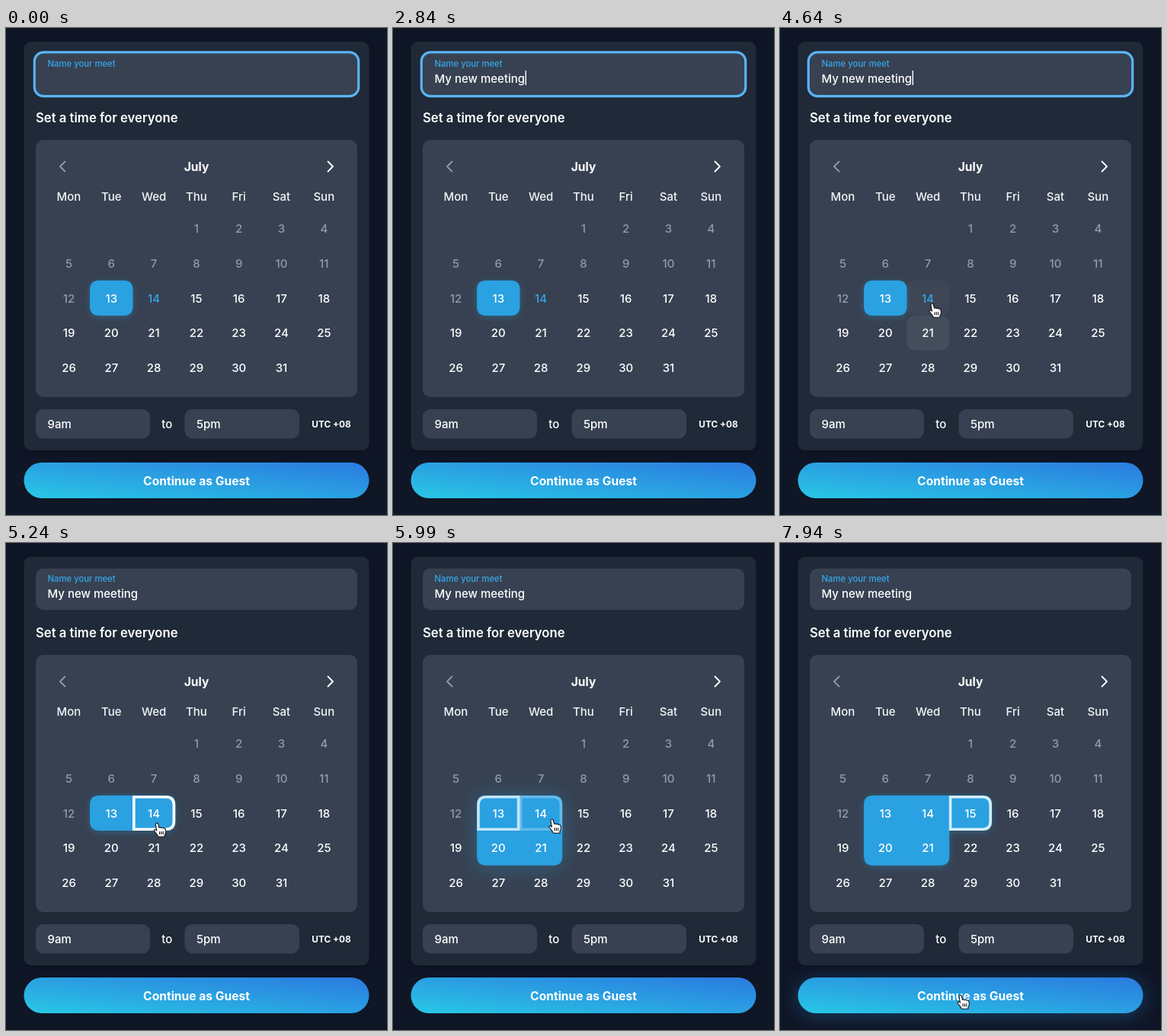
An HTML page for the animation above (7.99 s loop, 500 px wide and 640 px high).

```html
<!DOCTYPE html>
<html lang="en">
<head>
<meta charset="utf-8">
<title>Set a time</title>
<style>
html, body { margin: 0; width: 100%; height: 100%; overflow: hidden; background: #0f1626; }
svg { display: block; }
text { font: 500 15px Inter, Roboto, sans-serif; fill: #fff; white-space: pre; }
.mid { text-anchor: middle; }
.bold { font-weight: 700; font-size: 15.6px; }
.field { fill: #374151; }
#card { filter: drop-shadow(0 2px 6px #0a0f1c99); }
</style>
</head>
<body>
<svg width="500" height="640" viewBox="0 0 500 640">
  <defs>
    <linearGradient id="sky" x1="0" y1="1" x2="1" y2="0">
      <stop offset="0" stop-color="#28c8e5"/>
      <stop offset=".5" stop-color="#2aa0e2"/>
      <stop offset="1" stop-color="#2a7ae0"/>
    </linearGradient>
  </defs>
  <rect width="500" height="640" fill="#0f1626"/>
  <rect id="card" x="23.5" y="18" width="453" height="537" rx="9" fill="#1f2937"/>
  <rect class="field" x="39" y="33.5" width="422" height="54.5" rx="10"/>
  <rect id="ring" x="37.3" y="31.8" width="425.4" height="57.9" rx="12" fill="none" stroke="#5ab4f5" stroke-width="3.2"/>
  <text x="54.5" y="51" style="font-size:11.3px;fill:#36a7ea">Name your meet</text>
  <text id="typed" x="54.5" y="71.5"></text>
  <rect id="caret" y="56" width="1.4" height="19" fill="#fff"/>
  <text x="39" y="124" style="font-size:16.7px;font-weight:600">Set a time for everyone</text>

  <rect class="field" x="39" y="147" width="422" height="338" rx="10"/>
  <g fill="none" stroke-width="1.8" stroke-linecap="round" stroke-linejoin="round">
    <path d="M77.5 175.5L71 182l6.5 6.5" stroke="#9299a4"/>
    <path d="M422.5 175.5L429 182l-6.5 6.5" stroke="#fff"/>
  </g>
  <text class="mid bold" x="250" y="188">July</text>
  <g id="week"></g>
  <g id="hover" fill="#4b5361"></g>
  <g id="picked" fill="#2aa1e1"></g>
  <g id="focus" fill="none" stroke="#fff" stroke-width="3.6"></g>
  <g id="days"></g>

  <rect class="field" x="39" y="501" width="150" height="38.5" rx="10"/>
  <rect class="field" x="234.5" y="501" width="150.5" height="38.5" rx="10"/>
  <text x="54.5" y="526">9am</text>
  <text class="mid" x="211.3" y="526">to</text>
  <text x="250" y="526">5pm</text>
  <text class="mid bold" x="427" y="525" style="font-size:11.8px">UTC +08</text>

  <rect id="button" x="23.5" y="571" width="453" height="47" rx="23.5" fill="url(#sky)"/>
  <text class="mid bold" x="250" y="601">Continue as Guest</text>

  <g id="hand" stroke="#111" stroke-width="1.1" stroke-linejoin="round">
    <path fill="#fff" d="M-2 2Q-2 0-.5 0Q1 0 1.5 2L2.6 6.4Q4 5 5.4 6.6Q7 5.4 8.2 7.2Q10.6 6.4 11 9L11.4 12Q11.4 14 9.9 16V18.2H1.6L-.8 14.6L-3.6 11Q-4.6 9.2-2.8 8.8Q-1.6 8.8-.6 10.2Z"/>
    <path fill="none" d="M3.2 11.2v4M5.5 11.2v4M7.8 11.2v4"/>
  </g>
</svg>
<script>
const LOOP = 7990, W = 55.8, H = 45.7, LEFT = 54.6, TOP = 240.7, BLUR_AT = 4790;
const el = id => document.getElementById(id);
const days = Array.from({ length: 31 }, (_, i) => i + 1);

// Words of the title: text, start, time per letter
const words = [['My ', 310, 65], ['new ', 940, 75], ['meeting', 1390, 167]];

// Clicks: time, day (0 is the button)
const clicks = [[BLUR_AT, 14], [5390, 21], [5640, 20], [5790, 13], [5960, 14], [6290, 15], [7920, 0]];

// Pointer stops: time, x, y of the fingertip
const stops = [
  [3840, 300, 600], [4190, 300, 600], [4540, 196, 404], [4640, 200, 362], [5190, 200, 362],
  [5390, 190, 398], [5590, 142, 395], [5790, 148, 356], [5990, 209, 363], [6340, 247, 357],
  [7040, 247, 357], [7140, 229, 387], [7690, 237, 594], [LOOP, 237, 594]
];

// Share of the last few ms in which a test held: a linear fade
const soft = (test, t, ms = 150) => {
  let sum = 0;
  for (let i = 0; i < 15; i++) sum += test(t - i * ms / 15) ? 1 : 0;
  return sum / 15;
};

function pointer(t) {
  const i = stops.findIndex(s => s[0] > t);
  if (i < 1) return null;
  const [a, x, y] = stops[i - 1], [b, u, v] = stops[i];
  const k = (t - a) / (b - a), e = k * k * (3 - 2 * k);
  return [x + (u - x) * e, y + (v - y) * e];
}

const col = n => (n + 2) % 7, row = n => Math.floor((n + 2) / 7);

function hovers(n, t) {
  const p = pointer(t);
  return p && Math.floor((p[0] - LEFT) / W) === col(n) && Math.floor((p[1] - TOP) / H) === row(n);
}

function onButton(t) {
  const p = pointer(t);
  return p && p[1] > 571 && p[1] < 618;
}

const isPicked = (n, t) => n === 13 || clicks.some(c => c[1] === n && c[0] <= t);
const isFocused = (n, t) => clicks.filter(c => c[0] <= t).pop()?.[1] === n;

// Day outline; a corner is round unless a picked day touches one of its sides
function cell(n, t, inset, alpha) {
  const x = LEFT + col(n) * W + inset, y = TOP + row(n) * H + inset;
  const w = W - 2 * inset, h = H - 2 * inset;
  const r = (...near) => isPicked(n, t) && near.some(d => isPicked(n + d, t)) ? 0 : 12 - inset;
  const a = r(-1, -7), b = r(1, -7), c = r(1, 7), d = r(-1, 7);
  return `<path opacity="${alpha}" d="M${x + a} ${y}H${x + w - b}q${b} 0 ${b} ${b}V${y + h - c}` +
    `q0 ${c} ${-c} ${c}H${x + d}q${-d} 0 ${-d} ${-d}V${y + a}q0 ${-a} ${a} ${-a}z"/>`;
}

const cells = (t, inset, alpha) => days.map(n => {
  const a = alpha(n);
  return a > 0 ? cell(n, t, inset, a) : '';
}).join('');

const label = (c, y, s, color) =>
  `<text class="mid" x="${LEFT + (c + .5) * W}" y="${y}" style="fill:${color}">${s}</text>`;

function dayColor(n, t) {
  if (n < 13) return '#949ba6';
  return n === 14 && !isPicked(n, t) ? '#34a5e8' : '#fff';
}

el('week').innerHTML = 'Mon Tue Wed Thu Fri Sat Sun'.split(' ')
  .map((s, i) => label(i, 227, s, '#f4f5f7')).join('');

function draw(t) {
  el('typed').textContent = words.map(([s, start, gap]) =>
    s.slice(0, Math.max(0, Math.floor((t - start) / gap) + 1))).join('');
  const blink = t > 2490 && t < 4190 && (t - 2490) % 1000 < 350;
  el('caret').setAttribute('x', 55 + el('typed').getComputedTextLength());
  el('caret').style.opacity = t < 90 || t >= BLUR_AT || blink ? 0 : 1;
  el('ring').style.opacity = 1 - soft(s => s >= BLUR_AT, t, 100);

  el('hover').innerHTML = cells(t, 0, n => n < 13 || isPicked(n, t) ? 0 : soft(s => hovers(n, s), t));
  el('picked').innerHTML = cells(t, -.3, n => soft(s => isPicked(n, s), t, 100));
  el('focus').innerHTML = cells(t, 1.6, n => soft(s => isFocused(n, s), t));
  el('days').innerHTML = days.map(n =>
    label(col(n), TOP + (row(n) + .5) * H + 5.6, n, dayColor(n, t))).join('');

  const glow = 5 + 10 * soft(s => s > 5340 && s < 6290, t, 250);
  el('picked').style.filter = `drop-shadow(0 2px ${glow}px rgba(42,161,225,.32))`;
  el('button').style.filter = `drop-shadow(0 3px 12px rgba(42,150,230,${.32 * soft(onButton, t)}))`;

  const p = pointer(t);
  el('hand').style.display = p ? '' : 'none';
  if (p) el('hand').setAttribute('transform', `translate(${p})`);
}

function tick() {
  draw(performance.now() % LOOP);
  requestAnimationFrame(tick);
}
tick();
</script>
</body>
</html>
```
